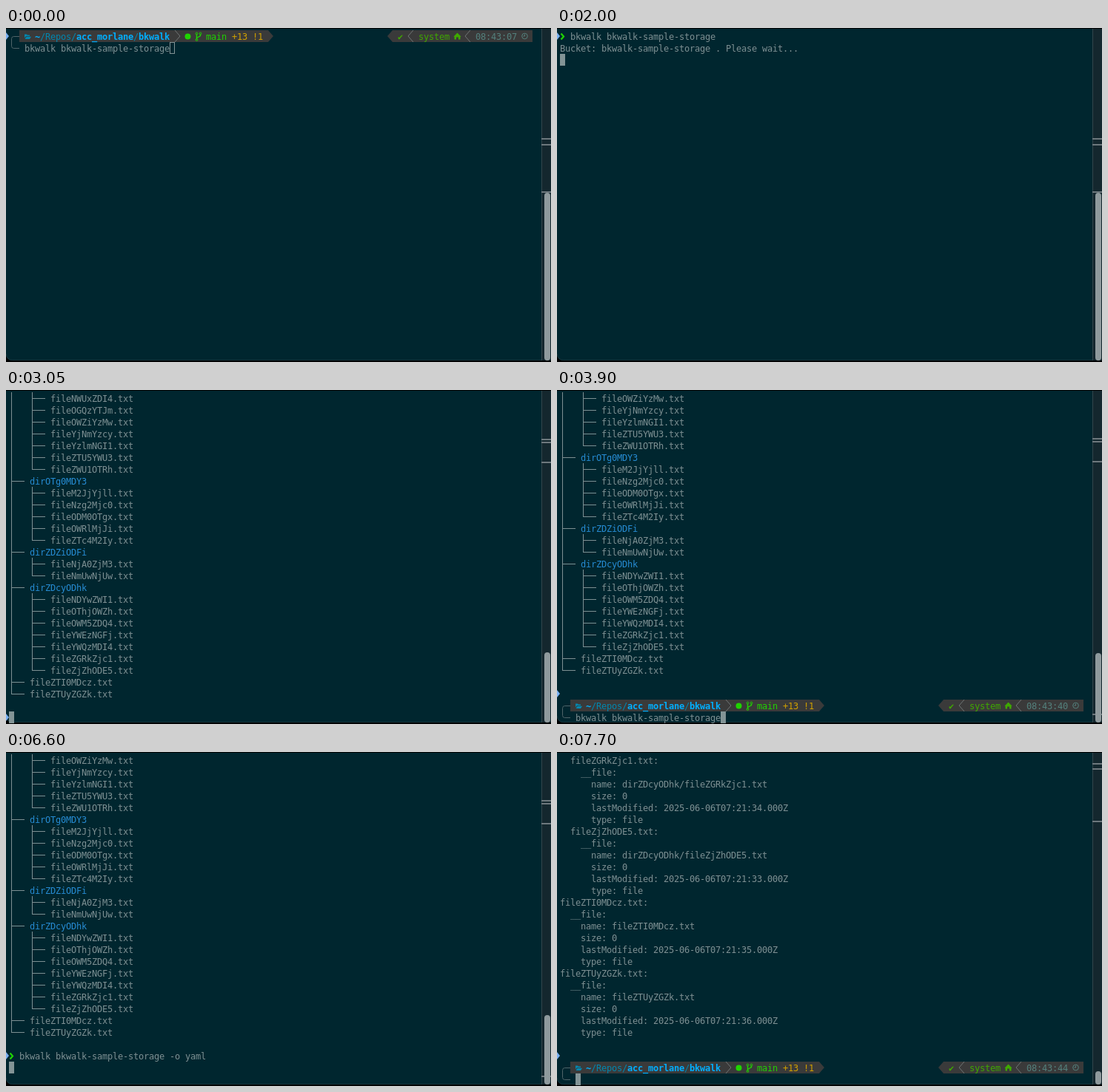
An HTML page with a canvas for the animation above (8 s loop, 736 by 452 pixels).

```html
<!DOCTYPE html>
<html lang="en">
<head>
<meta charset="utf-8">
<title>Terminal session</title>
<style>
html, body { margin: 0; width: 100%; height: 100%; overflow: hidden; background: #000; }
canvas { display: block; width: 736px; height: 452px; }
</style>
</head>
<body>
<canvas id="stage" width="736" height="452"></canvas>
<script>
const ctx = document.getElementById('stage').getContext('2d');
const LOOP = 8000, CELL = 7, LINE = 16;
const FONT = '12px "DejaVu Sans Mono", monospace';
const C = {
  bg: '#00262f', text: '#7e9093', dir: '#268bd2', seg: '#3a3a3a', sep: '#6f7575',
  path: '#0087af', anchor: '#00afff', git: '#1fd400', count: '#d0a000',
  ok: '#3fa800', time: '#53807c', mark: '#79b0f2', rule: '#506469'
};

const TOOL = 'bkwalk';
const BUCKET = 'bkwalk-sample-storage';
const COMMAND = `${TOOL} ${BUCKET}`;
const OPTION = ' -o yaml';
const KEY_TIMES = [4400, 4750, 5000, 5150, 5450, 5650, 5750, 5850];

const colX = c => 4 + CELL * c;
const rowY = r => 3 + LINE * r;

// Tree listing: each group is a directory followed by its files.
function treeLines() {
  const groups = [
    ['', 'NWUxZDI4 OGQzYTJm OWZiYzMw YjNmYzcy YzlmNGI1 ZTU5YWU3 ZWU1OTRh'],
    ['OTg0MDY3', 'M2JjYjll Nzg2Mjc0 ODM0OTgx OWRlMjJi ZTc4M2Iy'],
    ['ZDZiODFi', 'NjA0ZjM3 NmUwNjUw'],
    ['ZDcyODhk', 'NDYwZWI1 OThjOWZh OWM5ZDQ4 YWEzNGFj YWQzMDI4 ZGRkZjc1 ZjZhODE5']
  ];
  const lines = [];
  for (const [dir, list] of groups) {
    if (dir) lines.push(`├── dir${dir}`);
    const files = list.split(' ');
    files.forEach((f, i) => lines.push(`│   ${i < files.length - 1 ? '├' : '└'}── file${f}.txt`));
  }
  return lines.concat('├── fileZTI0MDcz.txt', '└── fileZTUyZGZk.txt');
}

function yamlLines() {
  const body = (pad, sec) => [
    `${pad}lastModified: 2025-06-06T07:21:${sec}.000Z`, `${pad}type: file`];
  const entry = (pad, dir, file, sec) => [
    `${pad}${file}:`, `${pad}  __file:`, `${pad}    name: ${dir}${file}`,
    `${pad}    size: 0`, ...body(pad + '    ', sec)];
  return [
    ...body('      ', 34),
    ...entry('  ', 'dirZDcyODhk/', 'fileZGRkZjc1.txt', 34),
    ...entry('  ', 'dirZDcyODhk/', 'fileZjZhODE5.txt', 33),
    ...entry('', '', 'fileZTI0MDcz.txt', 35),
    ...entry('', '', 'fileZTUyZGZk.txt', 36)
  ];
}

const TREE = treeLines(), YAML = yamlLines();

function rect(x, y, w, h, color) {
  ctx.fillStyle = color;
  ctx.fillRect(x, y, w, h);
}

function line(points, color, width = 1) {
  ctx.beginPath();
  points.forEach(([x, y]) => ctx.lineTo(x, y));
  ctx.strokeStyle = color;
  ctx.lineWidth = width;
  ctx.stroke();
}

function shape(points, color) {
  ctx.beginPath();
  points.forEach(([x, y]) => ctx.lineTo(x, y));
  ctx.fillStyle = color;
  ctx.fill();
}

function dot(x, y, r, color, hollow) {
  ctx.beginPath();
  ctx.arc(x, y, r, 0, 7);
  ctx.fillStyle = ctx.strokeStyle = color;
  ctx.lineWidth = 1;
  hollow ? ctx.stroke() : ctx.fill();
}

function boxChar(ch, x, y) {
  const mid = y + 8;
  if (ch !== '─') rect(x + 3, y, 1, ch === '└' ? 9 : LINE, C.text);
  if (ch === '─') rect(x, mid, CELL, 1, C.text);
  else if (ch !== '│') rect(x + 3, mid, 4, 1, C.text);
}

// Places glyphs on the terminal's cell grid.
function print(text, col, row, color = C.text, bold = false) {
  ctx.font = (bold ? 'bold ' : '') + FONT;
  [...text].forEach((ch, i) => {
    const x = colX(col + i), y = rowY(row);
    if ('│├└─'.includes(ch)) return boxChar(ch, x, y);
    ctx.fillStyle = color;
    ctx.fillText(ch, x, y + 13);
  });
}

function printLines(lines, top) {
  lines.forEach((text, i) => {
    const at = text.indexOf('dir');
    if (text[0] === '├' && at === 4) {
      print(text.slice(0, 4), 0, top + i);
      print(text.slice(4), 4, top + i, C.dir);
    } else print(text, 0, top + i);
  });
}

function cursor(col, row, hollow) {
  const x = colX(col), y = rowY(row);
  if (!hollow) return rect(x, y, CELL, LINE, '#839496');
  ctx.strokeStyle = '#839496';
  ctx.lineWidth = 1;
  ctx.strokeRect(x + .5, y + .5, CELL - 1, LINE - 1);
}

function promptMark(row) {
  const y = rowY(row) + 8;
  shape([[0, y - 5], [4, y], [0, y + 5]], C.mark);
}

function promptIcons(y) {
  const m = y + 8.5;
  shape([[25, m - 3], [28, m - 3], [29, m - 2], [32, m - 2], [32, m - .5], [27, m - .5], [25, m + 2]], C.path);
  shape([[27.5, m + .3], [34, m + .3], [32, m + 3.5], [25.5, m + 3.5]], C.path);
  dot(245.5, m, 4, C.git);
  line([[257.5, m - 3], [257.5, m + 4]], C.git, 1.4);
  line([[262.5, m - 3], [262.5, m - 1], [257.5, m + 2]], C.git, 1.4);
  [[257.5, m - 4], [262.5, m - 4], [257.5, m + 4.5]].forEach(([x, v]) => dot(x, v, 1.4, C.git, true));
  shape([[604.5, m], [609.5, m - 5], [614.5, m], [613.5, m + .5], [613.5, m + 4], [611, m + 4],
    [611, m + 1], [608, m + 1], [608, m + 4], [605.5, m + 4], [605.5, m + .5]], C.ok);
  dot(700.5, m - .5, 3.8, C.time, true);
  line([[700.5, m - 3], [700.5, m - .5], [698.5, m - .5]], C.time);
}

function prompt(row, clock) {
  const y = rowY(row), m = y + 8;
  shape([[18, y], [354, y], [361, m], [354, y + 16], [18, y + 16]], C.seg);
  shape([[711, y], [522, y], [515, m], [522, y + 16], [711, y + 16]], C.seg);
  ctx.beginPath();
  ctx.moveTo(18, m + .5);
  ctx.arcTo(7.5, m + .5, 7.5, m + 8, 3);
  ctx.arcTo(7.5, m + 16.5, 18, m + 16.5, 3);
  ctx.lineTo(18, m + 16.5);
  ctx.strokeStyle = C.rule;
  ctx.lineWidth = 1;
  ctx.stroke();

  print('~', 5, row, C.anchor, true);
  print('/Repos/', 6, row, C.path);
  print('acc_morlane', 13, row, C.anchor, true);
  print('/', 24, row, C.path);
  print(TOOL, 25, row, C.anchor, true);
  line([[228, y], [235, m], [228, y + 16]], C.sep);
  print('main', 38, row, C.git);
  print('+13 !1', 43, row, C.count);
  print('✔', 75, row, C.ok);
  line([[550, y], [543, m], [550, y + 16]], C.sep);
  print('system', 79, row, C.ok);
  line([[627, y], [620, m], [627, y + 16]], C.sep);
  print(clock, 90, row, C.time);
  promptIcons(y);
}

function ranCommand(text, row) {
  const m = rowY(row) + 8.5;
  line([[5.5, m - 4], [9, m], [5.5, m + 4]], C.git, 2.2);
  print(text, 2, row);
}

function windowFrame() {
  rect(0, 0, 736, 452, '#000');
  ctx.beginPath();
  ctx.roundRect(0, 1, 736, 449, [0, 0, 8, 8]);
  ctx.fillStyle = C.bg;
  ctx.fill();
  ctx.strokeStyle = '#17343c';
  ctx.lineWidth = 1;
  ctx.beginPath();
  ctx.moveTo(.5, 441);
  ctx.arcTo(.5, 449.5, 9, 449.5, 8);
  ctx.lineTo(723, 449.5);
  ctx.stroke();
}

function scrollbar(top, marks) {
  rect(723, 1, 13, 449, '#14272e');
  rect(723, 1, 1, 449, '#33454b');
  marks.forEach(y => rect(723, y - 1, 13, 2, '#6d787d'));
  ctx.beginPath();
  ctx.roundRect(727, top, 8, 450 - top, 4);
  ctx.fillStyle = '#8f9a9d';
  ctx.fill();
}

function pointer(t) {
  if (t < 850 || t >= 1700) return;
  const left = 1 - Math.min(1, (t - 850) / 350);
  const x = 462.5 + 40 * left ** 2, y = 37 - 42 * left ** 2;
  for (const [color, width] of [['#fff', 3], ['#111', 1]]) {
    line([[x, y - 6], [x, y + 6]], color, width);
    line([[x - 3, y - 8], [x - 1, y - 7.5], [x, y - 6], [x + 1, y - 7.5], [x + 3, y - 8]], color, width);
    line([[x - 3, y + 8], [x - 1, y + 7.5], [x, y + 6], [x + 1, y + 7.5], [x + 3, y + 8]], color, width);
  }
}

function drawScrollbar(t) {
  if (t < 2800) scrollbar(223, [150, 158, 222]);
  else if (t < 3150) scrollbar(355, [67, 71, 98]);
  else if (t < 7250) scrollbar(356, [66, 70, 97, 439]);
  else if (t < 7400) scrollbar(432, [17, 23, 93]);
  else scrollbar(432, [16, 23, 94]);
}

function firstRun(t) {
  promptMark(0);
  if (t < 1700) {
    prompt(0, '08:43:07');
    print(COMMAND, 3, 1);
    return cursor(31, 1, t < 50);
  }
  ranCommand(COMMAND, 0);
  if (t < 2000) return cursor(0, 1);
  print(`Bucket: ${BUCKET} . Please wait...`, 0, 1);
  cursor(0, 2);
}

function treeView(t) {
  if (t < 3150) {
    printLines(TREE, 0);
    promptMark(27);
    return cursor(0, 27);
  }
  printLines(TREE.slice(2), 0);
  promptMark(25);
  const typed = KEY_TIMES.filter(k => t >= k).length;
  const input = t < 3750 ? '' : COMMAND + OPTION.slice(0, typed);
  if (t < 6350) {
    prompt(26, '08:43:40');
    print(input, 3, 27);
    cursor(3 + input.length, 27);
  } else {
    ranCommand(input, 25);
    cursor(0, 26);
  }
}

function yamlView(t) {
  const done = t >= 7400;
  printLines(done ? YAML.slice(2) : YAML, 0);
  promptMark(done ? 25 : 27);
  if (done) prompt(26, '08:43:44');
  cursor(done ? 3 : 0, 27);
}

function draw(t) {
  windowFrame();
  drawScrollbar(t);
  if (t < 3000) firstRun(t);
  else if (t < 7250) treeView(t);
  else yamlView(t);
  pointer(t);
}

const start = performance.now();
function tick() {
  draw((performance.now() - start) % LOOP);
  requestAnimationFrame(tick);
}
tick();
</script>
</body>
</html>
```
